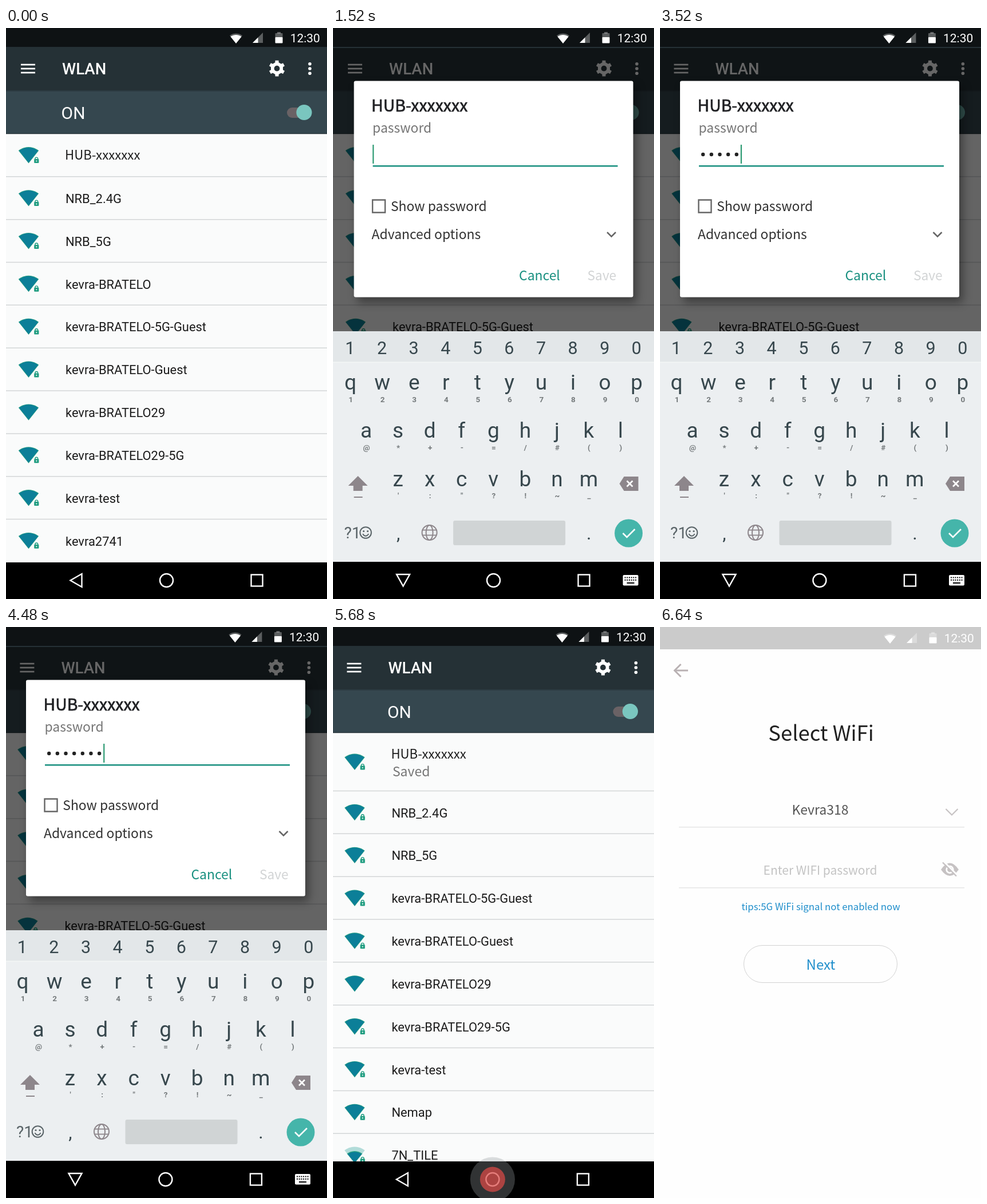
Recreate the animation shown at these times as an HTML page with a canvas. Size 561 px wide and 998 px high, loop 7.2 s.

```html
<!DOCTYPE html>
<html lang="en">
<head>
<meta charset="utf-8">
<title>WLAN setup</title>
<style>
html, body { margin: 0; width: 100%; height: 100%; overflow: hidden; background: #fff; }
canvas { display: block; width: 561px; height: 998px; }
</style>
</head>
<body>
<canvas id="stage" width="561" height="998"></canvas>
<script>
const W = 561, H = 998, LOOP = 7200, STEP = 80;
const ROBOTO = 'Roboto, sans-serif';
const HAN = '"Noto Sans CJK SC", "Noto Sans CJK JP", "Noto Sans CJK", "Noto Sans", sans-serif';
const TEAL = '#178f7f', SSID = 'HUB-xxxxxxx';
const before = ['NRB_2.4G', 'NRB_5G', 'kevra-BRATELO', 'kevra-BRATELO-5G-Guest', 'kevra-BRATELO-Guest',
  'kevra-BRATELO29', 'kevra-BRATELO29-5G', 'kevra-test', 'kevra2741'];
const after = [...before.filter((_, i) => i !== 2 && i < 8), 'Nemap', '7N_TILE'];
const typedAt = [1760, 2240, 2640, 3120, 3520, 3920, 4320, 4800];

const stage = document.getElementById('stage').getContext('2d');
let c = stage;

const clamp = v => Math.max(0, Math.min(1, v));
const span = (t, a, b) => clamp((t - a) / (b - a));
const easeOut = p => 1 - (1 - p) ** 2;

function rect(x, y, w, h, color, r = 0) {
  c.fillStyle = color;
  c.beginPath();
  c.roundRect(x, y, w, h, r);
  c.fill();
}

function disc(x, y, r, color) {
  c.fillStyle = color;
  c.beginPath();
  c.arc(x, y, r, 0, 7);
  c.fill();
}

function ring(x, y, r, color, width) {
  c.strokeStyle = color;
  c.lineWidth = width;
  c.beginPath();
  c.arc(x, y, r, 0, 7);
  c.stroke();
}

function trace(pts, close) {
  c.beginPath();
  for (let i = 0; i < pts.length; i += 2) c.lineTo(pts[i], pts[i + 1]);
  if (close) c.closePath();
}

function poly(color, ...pts) {
  trace(pts, true);
  c.fillStyle = color;
  c.fill();
}

function line(color, width, close, ...pts) {
  trace(pts, close);
  c.strokeStyle = color;
  c.lineWidth = width;
  c.stroke();
}

function text(s, x, y, size, color, family = ROBOTO, weight = 400, align = 'left') {
  c.font = `${weight} ${size}px ${family}`;
  c.textAlign = align;
  c.fillStyle = color;
  c.fillText(s, x, y);
}

const mid = (s, x, y, size, color, family, weight) => text(s, x, y, size, color, family, weight, 'center');

function shifted(x, y, draw, alpha = 1) {
  c.save();
  c.translate(x, y);
  c.globalAlpha *= alpha;
  draw();
  c.restore();
}

// Signal fan with its tip at (x, y)
function fan(x, y, w, h, color) {
  const l = x - w / 2, r = x + w / 2, side = y - h * 0.784, low = y - h * 0.802, top = y - h;
  c.fillStyle = color;
  c.beginPath();
  c.moveTo(x, y);
  c.lineTo(l, side);
  c.bezierCurveTo(l + w * 0.02, low, x - w * 0.289, top, x, top);
  c.bezierCurveTo(x + w * 0.289, top, r - w * 0.02, low, r, side);
  c.closePath();
  c.fill();
}

function gear(x, y, r, hole, teeth, color) {
  c.fillStyle = color;
  c.beginPath();
  for (let i = 0; i < teeth; i++) {
    [[-0.28, 0.76], [-0.2, 1], [0.2, 1], [0.28, 0.76]].forEach(([d, k]) => {
      const a = (i + d) * 2 * Math.PI / teeth - Math.PI / 2;
      c.lineTo(x + Math.cos(a) * r * k, y + Math.sin(a) * r * k);
    });
  }
  c.closePath();
  c.moveTo(x + hole, y);
  c.arc(x, y, hole, 0, 2 * Math.PI);
  c.fill('evenodd');
}

function statusIcons(dy = 0) {
  shifted(0, dy, () => {
    const dim = 'rgba(255,255,255,.32)';
    fan(402, 27, 22, 17.5, dim);
    fan(402, 27, 19, 15, '#fff');
    poly(dim, 449, 8, 449, 26, 431, 26);
    poly('#fff', 440.5, 16.5, 440.5, 26, 431, 26);
    rect(474, 7, 6, 3, dim);
    rect(470.5, 9, 13, 8, dim, 1);
    rect(470.5, 16, 13, 10.5, '#fff', 1);
    text('12:30', 496.7, 24.5, 20.9, '#fff');
  });
}

function navBar(color = '#fff') {
  line(color, 2.4, true, 112.5, 965.5, 132.5, 954, 132.5, 977);
  homeAndRecent(color);
}

function homeAndRecent(color) {
  ring(280.5, 965.5, 11.5, color, 2.4);
  c.strokeRect(428.5, 955.5, 20, 20);
}

function wifiIcon(y, locked, weak) {
  if (weak) {
    fan(39.5, y, 35.4, 28.4, '#b2dcd9');
    fan(39.5, y, 27, 21, '#2aa084');
    fan(39.5, y - 1, 24, 18.5, '#0c7c98');
  } else {
    fan(39.5, y, 35.4, 28.4, '#2aa084');
    fan(39.5, y - 1.2, 33, 26.4, '#0c7f98');
  }
  if (!locked) return;
  rect(48, y - 9, 11, 10, '#fafafa', 1);
  ring(53.3, y - 8, 2.4, '#1f9d80', 1.4);
  rect(49.2, y - 7.5, 8.2, 7, '#1f9d80', 1);
  disc(53.3, y - 4, 1.1, '#fafafa');
}

function wlanScreen(saved, pressed) {
  const row = 74.85, first = saved ? 101.5 : row;
  rect(-5, 0, W + 10, 33, '#0e1214');
  rect(-5, 33, W + 10, 77, '#253136');
  rect(-5, 110, W + 10, 75, '#35474f');
  rect(-5, 109, W + 10, 2, '#2d3c43');
  rect(-5, 185, W + 10, 749, '#fafbfb');
  rect(-5, 184, W + 10, 1.3, '#1f2c32');
  statusIcons();
  for (let i = 0; i < 3; i++) {
    rect(26, 62.7 + 7 * i, 25, 2.7, '#fff');
    disc(531, 62.7 + 8.3 * i, 2.8, '#fff');
  }
  text('WLAN', 98, 81.3, 27.5, '#fff', ROBOTO, 500);
  gear(473.5, 70.7, 14.2, 4.9, 6, '#fff');
  text('ON', 96.6, 159, 29.9, '#fff');
  rect(491, 139, 36, 18, '#6a6265', 9);
  disc(521, 147.5, 13.6, '#7ac6bf');

  if (pressed) rect(-5, 186, W + 10, 73.5, `rgba(120,130,135,${pressed})`);
  wifiIcon(saved ? 250 : 236.5, true);
  text(SSID, 103, 230, 22.2, '#1c1c1c', HAN);
  if (saved) text('Saved', 105.5, 260.5, 23, '#757575', HAN);
  (saved ? after : before).forEach((name, i) => {
    const top = 185 + first + i * row;
    rect(-5, top - 0.8, W + 10, 1.5, '#d3d6d7');
    wifiIcon(top + 51.7, !name.endsWith('O29'), name === after[8]);
    text(name, 104, top + 46, 21.9, '#1c1c1c');
  });
  rect(-5, 934, W + 10, 70, '#000');
  navBar();
}

function keyRow(keys, hints, x, y) {
  [...keys].forEach((k, i) => {
    mid(k, x + 55.55 * i, y, 37, '#37474d');
    mid(hints[i], x + 55.55 * i + 0.5, y + 21.5, 13.5, '#757a7c', ROBOTO, 700);
  });
}

function keyboard() {
  const gray = '#8d868b', ink = '#5a6468';
  rect(-5, 530, W + 10, 403, '#eceff1');
  rect(-5, 530, W + 10, 54, '#e3e7e9');
  rect(-5, 583.5, W + 10, 1.2, '#f6f8f8');
  [...'1234567890'].forEach((k, i) => mid(k, 28.3 + 55.6 * i, 570, 30.5, '#37474d'));
  keyRow('qwertyuiop', '1234567890', 29, 632);
  keyRow('asdfghjkl', '@*+-=/#()', 56.5, 716);
  keyRow('zxcvbnm', '\':"?!~_', 112, 800.5);
  poly(gray, 42, 783, 59, 800, 50, 800, 50, 809, 34, 809, 34, 800, 25, 800);
  rect(35, 819, 15, 2, gray);
  poly(gray, 499, 796.5, 507, 784, 532, 784, 532, 809, 507, 809);
  line('#fff', 2.6, false, 512, 791.5, 522, 801.5);
  line('#fff', 2.6, false, 522, 791.5, 512, 801.5);
  text('?1', 18, 892, 28, ink);
  ring(55.5, 882, 9.8, ink, 2);
  disc(52, 879.5, 1.6, ink);
  disc(59, 879.5, 1.6, ink);
  c.beginPath();
  c.arc(55.5, 882.5, 5.2, 0.3, 2.84);
  c.stroke();
  mid(',', 112.5, 894, 32, '#37474d');
  ring(167, 882, 13, gray, 2);
  c.beginPath();
  c.ellipse(167, 882, 6, 13, 0, 0, 7);
  c.stroke();
  line(gray, 1.8, false, 155, 877.5, 179, 877.5);
  line(gray, 1.8, false, 155, 886.5, 179, 886.5);
  rect(208.5, 861, 196, 43, '#d0d4d5', 3);
  mid('.', 445.5, 894, 32, '#37474d');
  disc(515, 883, 24.5, '#45b5aa');
  line('#fff', 2.6, false, 505, 883, 512, 890, 526, 876);
  rect(-5, 933, W + 10, 70, '#000');
  line('#fff', 2.4, true, 109.5, 955, 132.5, 955, 121, 975.5);
  shifted(-1.6, 0, () => homeAndRecent('#fff'));
  rect(505, 956, 27, 18.5, '#fff', 2);
  for (let i = 0; i < 6; i++) {
    rect(508 + i * 3.7, 959.5, 2, 2, '#000');
    rect(508 + i * 3.7, 963.8, 2, 2, '#000');
  }
  rect(512, 969, 13, 2, '#000');
}

function dialog(dots, ready) {
  rect(-5, 35, W + 10, 900, 'rgba(0,0,0,.6)');
  c.save();
  c.shadowColor = 'rgba(0,0,0,.4)';
  c.shadowBlur = 16;
  c.shadowOffsetX = 6;
  c.shadowOffsetY = 9;
  rect(35, 92.5, 488, 378, '#fff', 3);
  c.restore();
  text(SSID, 65.5, 145.5, 28.4, '#202124', HAN);
  // Thickens the title to a medium weight
  c.lineWidth = 0.7;
  c.strokeStyle = '#202124';
  c.strokeText(SSID, 65.5, 145.5);
  text('password', 67.5, 182.5, 22.9, '#757575', HAN);
  for (let i = 0; i < dots; i++) disc(75.2 + 14.65 * i, 221, 3.2, '#222');
  rect(67.6 + 14.65 * dots, 204, 2.2, 33, '#2c9a72');
  rect(68, 240, 428, 2.5, TEAL);
  line('#666', 2.4, true, 67.5, 300.5, 89.5, 300.5, 89.5, 322.5, 67.5, 322.5);
  text('Show password', 99.3, 319.5, 22.9, '#303030', HAN);
  text('Advanced options', 66, 368.5, 22.9, '#303030', HAN);
  line('#666', 2.5, false, 477.5, 357, 485, 364.5, 492.5, 357);
  text('Cancel', 323.5, 440.5, 22.9, TEAL, HAN);
  text('Save', 443, 440.5, 22.7, ready ? TEAL : '#d2d4d5', HAN);
  keyboard();
}

function makeWallpaper() {
  const cv = document.createElement('canvas');
  cv.width = W;
  cv.height = H;
  c = cv.getContext('2d');
  let seed = 7;
  const rnd = () => (seed = seed * 16807 % 2147483647) / 2147483647;
  // Brush strokes scattered along a line, denser at its middle
  const sweep = (color, x0, y0, x1, y1, spread, n) => {
    for (let i = 0; i < n; i++) {
      const p = rnd(), len = 5 + rnd() * 20;
      const x = x0 + (x1 - x0) * p + (rnd() + rnd() - 1) * spread;
      const y = y0 + (y1 - y0) * p + (rnd() - 0.5) * spread;
      line(color, 0.8 + rnd() * 2, false, x, y, x + len * 0.6, y - len * 0.8);
    }
  };
  const dark = '#3a5059', sea = '#0b7d98', mint = '#47b3ac', gray = '#59666b';
  rect(0, 0, W, H, sea);
  poly(dark, 0, 0, 150, 0, 110, 100, 160, 230, 260, 330, 230, 400, 120, 470, 260, 998, 0, 998);
  sweep(dark, 170, 10, 120, 120, 80, 260);
  sweep(sea, 200, 10, 40, 30, 60, 220);
  sweep(dark, 170, 190, 300, 370, 85, 750);
  sweep(sea, 130, 230, 260, 350, 70, 380);
  sweep(sea, 20, 300, 150, 450, 60, 380);
  sweep(mint, 320, 130, 225, 280, 55, 620);
  sweep(mint, 400, 130, 370, 460, 85, 1700);
  sweep(mint, 450, 150, 520, 140, 35, 330);
  sweep(mint, 500, 310, 490, 460, 50, 420);
  sweep(sea, 390, 150, 370, 460, 90, 330);
  sweep(gray, 442, 200, 485, 315, 9, 100);
  sweep(gray, 20, 140, 150, 380, 80, 220);
  sweep('#8f7d78', 40, 560, 95, 630, 20, 120);
  poly('#e4ecec', 85, 620, 118, 645, 155, 760, 172, 860, 216, 945, 185, 945, 140, 850, 118, 740);
  sweep('#e4ecec', 95, 640, 195, 935, 24, 200);
  sweep(mint, 330, 560, 460, 900, 90, 200);
  c = stage;
  return cv;
}
const wallpaper = makeWallpaper();

function homeScreen() {
  c.drawImage(wallpaper, 0, 0);
  statusIcons();
  rect(11, 43, 539, 65, '#fff', 3);
  disc(70, 75, 15, '#4285f4');
  disc(512, 75, 10, '#4285f4');
  gear(62, 174, 40, 25, 8, '#606a70');
  disc(62, 174, 25, '#455259');
  ring(62, 174, 20, '#e9efef', 6);
  disc(62, 174, 11, '#a9e6de');
  rect(127, 130, 88, 88, '#14b4f7', 18);
  mid('setting', 62.5, 243.5, 20.2, '#fff', HAN);
  mid('Pemo', 171, 243.5, 20.2, '#fff', HAN);

  disc(265, 803, 4, 'rgba(255,255,255,.7)');
  disc(281, 803, 4, 'rgba(255,255,255,.7)');
  disc(297, 803, 6, '#fff');
  [70, 175, 400].forEach(x => disc(x, 871, 27, '#f2f5f5'));
  disc(281, 871, 30, '#fff');
  for (let i = 0; i < 9; i++) disc(271 + i % 3 * 10, 861 + Math.floor(i / 3) * 10, 2.8, '#60757c');
  rect(465, 847, 71, 49, '#f2f5f5', 4);
  disc(500, 871, 17, '#b9c4c7');
  disc(500, 871, 9, '#f2f5f5');
  navBar();
}

function appScreen() {
  const pale = '#c6c2c3';
  rect(0, 0, W, H, '#fefefe');
  rect(0, 0, W, 39, '#cbcbcb');
  statusIcons(2);
  line('#b9b1b3', 3, false, 49, 76, 26, 76);
  line('#b9b1b3', 3, false, 36.5, 65, 25.5, 76, 36.5, 87);
  mid('Select WiFi', 281.5, 199, 36.4, '#212121', HAN);
  mid('Kevra318', 280, 327.5, 23, '#555', HAN);
  line(pale, 2.2, false, 499.5, 318, 510, 328.5, 520.5, 318);
  rect(33, 349, 499, 1.4, '#e6e6e6');
  mid('Enter WIFI password', 280, 433, 21, '#c3c3c3', HAN);
  c.fillStyle = pale;
  c.beginPath();
  c.moveTo(491, 424);
  c.quadraticCurveTo(506.5, 401, 522, 424);
  c.quadraticCurveTo(506.5, 446, 491, 424);
  c.fill();
  disc(506.5, 424, 7.2, '#fefefe');
  disc(506.5, 424, 4.4, pale);
  line('#fefefe', 3, false, 496, 410, 521, 435);
  line(pale, 2.4, false, 494, 411.5, 518, 435.5);
  rect(33, 455, 499, 1.4, '#e6e6e6');
  mid('tips:5G WiFi signal not enabled now', 281, 495, 16.8, '#1f8ecb', HAN);
  c.beginPath();
  c.roundRect(146.5, 556.5, 268, 65, 32.5);
  c.lineWidth = 1;
  c.strokeStyle = '#d2d2d2';
  c.stroke();
  mid('Next', 281, 598.5, 24, '#1f8ecb', HAN);
}

// Spreading halo around a red finger mark
function touch(t, start, length, x, y) {
  const p = (t - start) / length;
  if (p < 0 || p >= 1) return;
  shifted(0, 0, () => {
    disc(x, y, 22 + 39 * easeOut(p), 'rgba(150,154,158,.33)');
    disc(x, y, 22, 'rgba(236,76,72,.66)');
  }, clamp(p / 0.25) * (1 - clamp((p - 0.4) / 0.6)));
}

function draw(t) {
  c.setTransform(1, 0, 0, 1, 0, 0);
  c.globalAlpha = 1;
  c.clearRect(0, 0, W, H);
  if (t < 5920) {
    const saved = t >= 5440;
    shifted(t >= 1680 ? -1.6 : 0, 0, () => {
      const glow = t >= 80 && t < 800 ? 0.22 * Math.sin(Math.PI * span(t, 0, 800)) : 0;
      wlanScreen(saved, glow);
      touch(t, 40, 760, 280, 231.5);
      if (t > 800 && !saved) {
        const off = 980 * (1 - easeOut(span(t, 800, 1520)) + span(t, 5280, 5440) ** 2);
        const dots = typedAt.filter(a => a <= t).length;
        shifted(1.6, off, () => dialog(dots, dots > 7));
      }
      touch(t, 4960, 320, 470, 432);
      touch(t, 5600, 320, 280.5, 965.5);
    });
    return;
  }
  if (t < 6640) {
    homeScreen();
    touch(t, 6120, 320, 171, 182);
    const drop = span(t, 5920, 6320) ** 1.555;
    if (drop < 1) shifted(0, H * drop, () => wlanScreen(true), 1 - 0.5 * drop * drop);
  }
  const rise = easeOut(span(t, 6320, 6640));
  if (rise > 0) shifted(0, H * (1 - rise), appScreen, 0.4 + 0.6 * rise);
}

const began = performance.now();
function tick() {
  const t = (performance.now() - began) % LOOP;
  draw(Math.floor(t / STEP) * STEP);
  requestAnimationFrame(tick);
}
tick();
</script>
</body>
</html>
```
